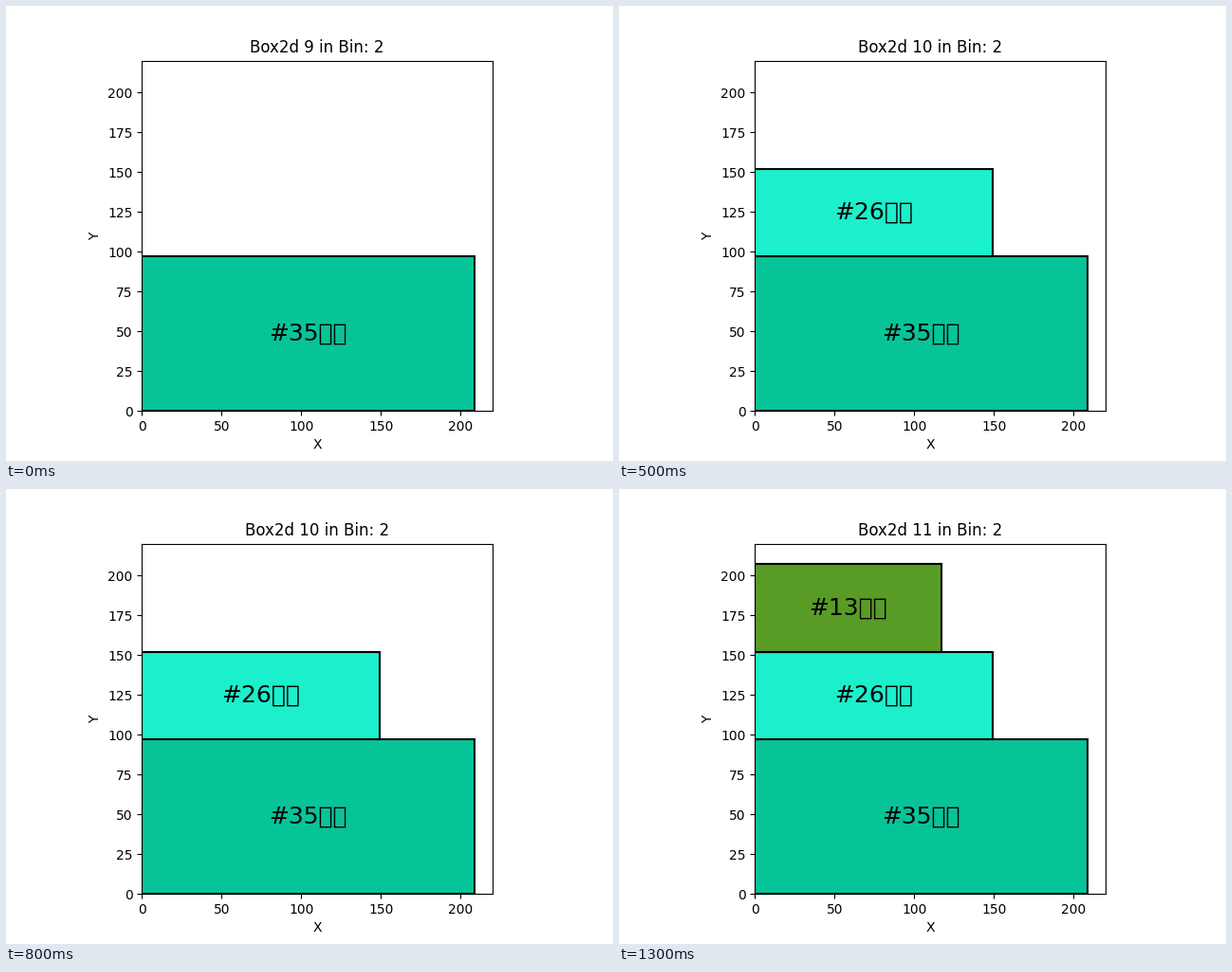
Recreate the animation shown at these times as a matplotlib script. Size 640x480 px, loop 1.5 s.

```python
import matplotlib.pyplot as plt
from matplotlib.animation import FuncAnimation
from matplotlib.patches import Rectangle

plt.rcParams["font.family"] = "DejaVu Sans"

BIN_SIZE = 220
FIRST_STEP = 9
# label number, width, bottom, top, colour
BOXES = [
    (35, 209, 0, 97, "#07c498"),
    (26, 149, 97, 152, "#1cefcb"),
    (13, 117, 152, 207, "#589c26"),
]
# Characters missing from the font show as empty boxes.
SUFFIX = "\u7269\u54c1"

fig, ax = plt.subplots(figsize=(6.4, 4.8), dpi=100)
ax.set_xlim(0, BIN_SIZE)
ax.set_ylim(0, BIN_SIZE)
ax.set_aspect("equal")
ax.set_xlabel("X")
ax.set_ylabel("Y")
title = ax.set_title("")


def add_box(number, width, bottom, top, color):
    rect = ax.add_patch(Rectangle((0, bottom), width, top - bottom,
                                  facecolor=color, edgecolor="black", lw=1.5))
    label = ax.text(width / 2, (bottom + top) / 2, f"#{number}{SUFFIX}",
                    fontsize=18, ha="center", va="center")
    return rect, label


boxes = [add_box(*box) for box in BOXES]


def update(step):
    title.set_text(f"Box2d {FIRST_STEP + step} in Bin: 2")
    for i, parts in enumerate(boxes):
        for part in parts:
            part.set_visible(i <= step)
    return [title]


anim = FuncAnimation(fig, update, frames=len(BOXES), interval=500,
                     repeat=True, repeat_delay=0)
plt.show()
```
